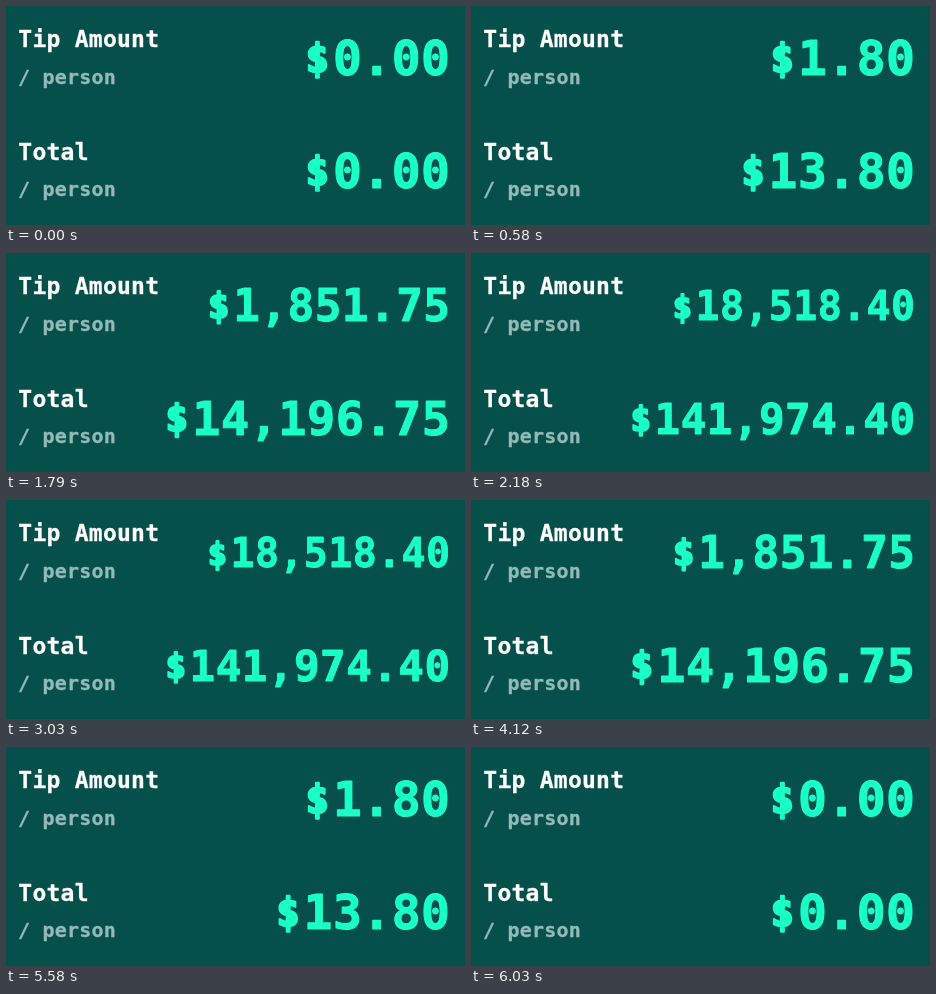
Recreate the animation shown at these times as an HTML page. Size 459 by 219 pixels, loop 6.3 s.

```html
<!DOCTYPE html>
<html lang="en">
<head>
<meta charset="utf-8">
<title>Tip calculator</title>
<style>
  html, body { margin: 0; width: 100%; height: 100%; overflow: hidden; background: #06504c; }
  svg { display: block; width: 459px; height: 219px; }
  text { font-family: "DejaVu Sans Mono", monospace; font-weight: 700; letter-spacing: .01em; stroke-linejoin: round; }
  .label { font-size: 23px; letter-spacing: .011em; fill: #fff; stroke: #fff; stroke-width: .3px; }
  .unit { font-size: 20px; fill: #94bab7; stroke: #94bab7; stroke-width: .3px; }
  .amount, .sign { fill: #1affc6; stroke: #1affc6; }
  .amount { text-anchor: end; stroke-width: .022em; }
  .sign { text-anchor: middle; letter-spacing: 0; stroke-width: .06em; }
</style>
</head>
<body>
<svg viewBox="0 0 459 219">
  <g id="tip">
    <text class="label" x="12.3" y="41">Tip Amount</text>
    <text class="unit" x="12" y="78">/ person</text>
    <text class="sign">$</text>
    <text class="amount"></text>
  </g>
  <g id="total" transform="translate(0 113)">
    <text class="label" x="12.3" y="41">Total</text>
    <text class="unit" x="12" y="77">/ person</text>
    <text class="sign">$</text>
    <text class="amount"></text>
  </g>
</svg>
<script>
const LOOP = 6300;
const RIGHT = 444.5;
const MAX_SIZE = 48;
const ADVANCE = 0.612;
const TIP_RATE = 0.15;

// [time in ms, bill]: digits are typed in, then deleted again
const keys = [
  [0, 0], [30, 1], [340, 12], [700, 123], [1520, 1234], [1790, 12345], [2180, 123456],
  [4000, 12345], [4730, 1234], [5090, 123], [5580, 12], [5720, 1], [5850, 0]
];

const money = new Intl.NumberFormat("en-US", { minimumFractionDigits: 2, maximumFractionDigits: 2 });

function setAttributes(element, attributes) {
  for (const name in attributes) element.setAttribute(name, attributes[name]);
}

// Shrinks long amounts so they stay clear of the label.
function showAmount(id, value, maxWidth) {
  const row = document.getElementById(id);
  const digits = money.format(value);
  const cells = digits.length + 1;
  const size = Math.min(MAX_SIZE, maxWidth / (cells * ADVANCE));
  const baseline = 59.4 + 0.2 * size;

  const amount = row.querySelector(".amount");
  amount.textContent = digits;
  setAttributes(amount, { x: RIGHT, y: baseline, "font-size": size });

  setAttributes(row.querySelector(".sign"), {
    x: RIGHT - (cells - 0.5) * ADVANCE * size - 0.02 * size,
    y: baseline - 0.07 * size,
    "font-size": 0.8 * size
  });
}

let shownBill;

function draw(now) {
  const time = now % LOOP;
  const [, bill] = keys.findLast(([start]) => start <= time);
  if (bill !== shownBill) {
    shownBill = bill;
    showAmount("tip", bill * TIP_RATE, 244.5);
    showAmount("total", bill * (1 + TIP_RATE), 287);
  }
}

const startTime = performance.now();

function frame() {
  draw(performance.now() - startTime);
  requestAnimationFrame(frame);
}

frame();
</script>
</body>
</html>
```
